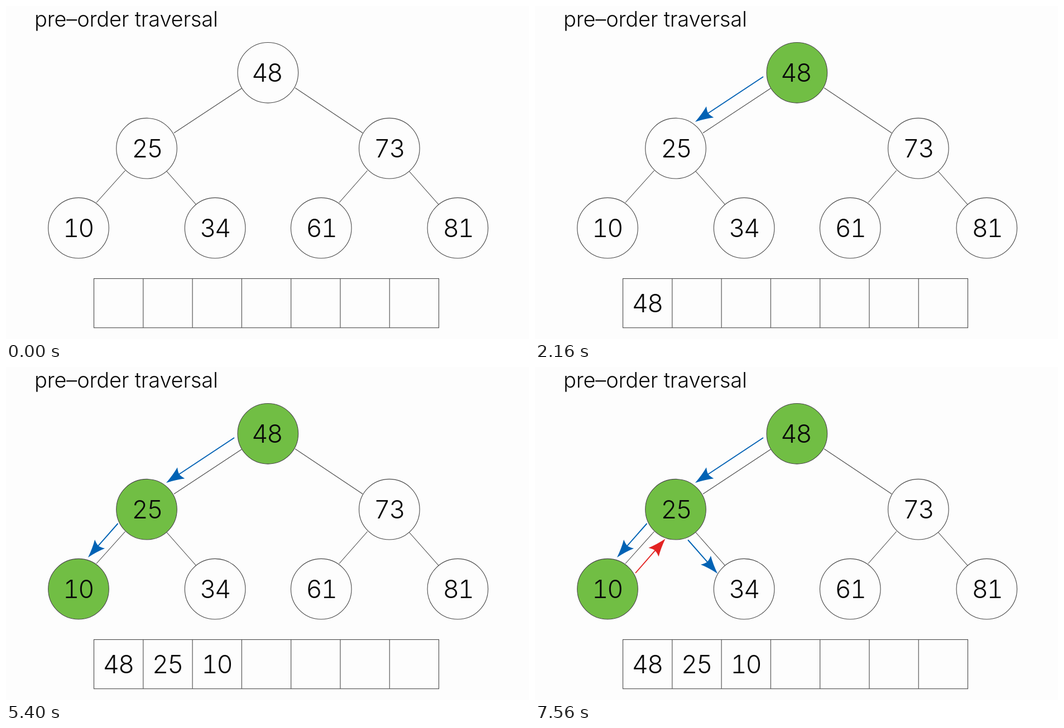
Write an HTML page that moves like this. It is 937 by 598 pixels and loops after 8 s.

```html
<!DOCTYPE html>
<html lang="en">
<head>
<meta charset="utf-8">
<title>Tree traversal</title>
<style>
  html, body { margin: 0; width: 100%; height: 100%; overflow: hidden; background: #fdfdfd; }
  svg { display: block; width: 100vw; height: 100vh; }
  text { font-family: Inter, "Liberation Sans", sans-serif; font-weight: 300; fill: #0a0a0a; }
  .title { font-size: 38px; letter-spacing: -.2px; }
  .number { font-size: 45px; letter-spacing: -2px; text-anchor: middle; font-variant-numeric: tabular-nums; }
  .outline { fill: none; stroke: #484848; stroke-width: 1.1; }
</style>
</head>
<body>
<svg id="stage" viewBox="0 0 937 598">
  <text class="title" x="51" y="36.5">pre–order traversal</text>
</svg>
<script>
const STEP = 1080, LOOP = 8000;
const BLUE = '#0062b4', RED = '#e32322', GREEN = '#71be44';
const stage = document.getElementById('stage');
const timed = [];

function add(tag, attrs, step = 0) {
  const el = document.createElementNS('http://www.w3.org/2000/svg', tag);
  for (const key in attrs) el.setAttribute(key, attrs[key]);
  stage.append(el);
  if (step) timed.push({ el, step });
  return el;
}

function number(value, x, y, step) {
  add('text', { class: 'number', x, y }, step).textContent = value;
}

function line(x1, y1, x2, y2) {
  add('line', { class: 'outline', x1, y1, x2, y2 });
}

// Shaft plus a swept head, drawn along the x axis with the tip at the origin.
function arrow(x1, y1, x2, y2, color, step) {
  const length = Math.hypot(x2 - x1, y2 - y1);
  const angle = Math.atan2(y2 - y1, x2 - x1) * 180 / Math.PI;
  const transform = `translate(${x2} ${y2}) rotate(${angle})`;
  add('path', { d: `M${-length} 0H-27`, stroke: color, 'stroke-width': 1.9, transform }, step);
  add('path', { d: 'M0 0Q-18 -5 -32 -12Q-28 -4 -28 0Q-28 4 -32 12Q-18 5 0 0Z', fill: color, transform }, step);
}

// Circle centre, value, text offset, step at which the node is visited.
const nodes = [
  [469.3, 119.8, 48, -2, 1],
  [252, 255.7, 25, .5, 3],
  [686.8, 255.7, 73, -.5, 0],
  [130, 398.7, 10, -.7, 5],
  [374.6, 398.7, 34, -.5, 0],
  [564.7, 398.7, 61, 0, 0],
  [809.3, 398.7, 81, .5, 0]
];
for (const [cx, cy, value, dx, step] of nodes) {
  if (step) add('circle', { cx, cy, r: 54.3, fill: GREEN }, step);
  add('circle', { class: 'outline', cx, cy, r: 54.3 });
  number(value, cx + dx, cy + 16.6);
}

line(422, 148, 301, 228);
line(518, 147, 639, 228);
line(213.5, 295.5, 162, 353);
line(288, 297, 340.5, 356.5);
line(647.5, 295.5, 597, 353);
line(722.5, 297, 775, 356.5);

const left = 157.5, top0 = 489.5, cell = 88.28;
add('rect', { class: 'outline', x: left, y: top0, width: cell * 7, height: 88.3 });
for (let i = 1; i < 7; i++) {
  const x = left + cell * i;
  line(x, top0, x, top0 + 88.3);
}
[[48, 1], [25, 3], [10, 5]].forEach(([value, step], i) =>
  number(value, left + cell * (i + .5) - .7, 549.8, step));

arrow(409, 127, 287, 208, BLUE, 2);
arrow(200.5, 281, 147, 342, BLUE, 4);
arrow(180, 370, 233.5, 308.5, RED, 6);
arrow(274, 310.5, 327, 371, BLUE, 7);

const start = performance.now();
function draw() {
  const now = Math.max(0, performance.now() - start) % LOOP;
  for (const { el, step } of timed) {
    el.style.visibility = now >= step * STEP ? 'visible' : 'hidden';
  }
  requestAnimationFrame(draw);
}
draw();
</script>
</body>
</html>
```
